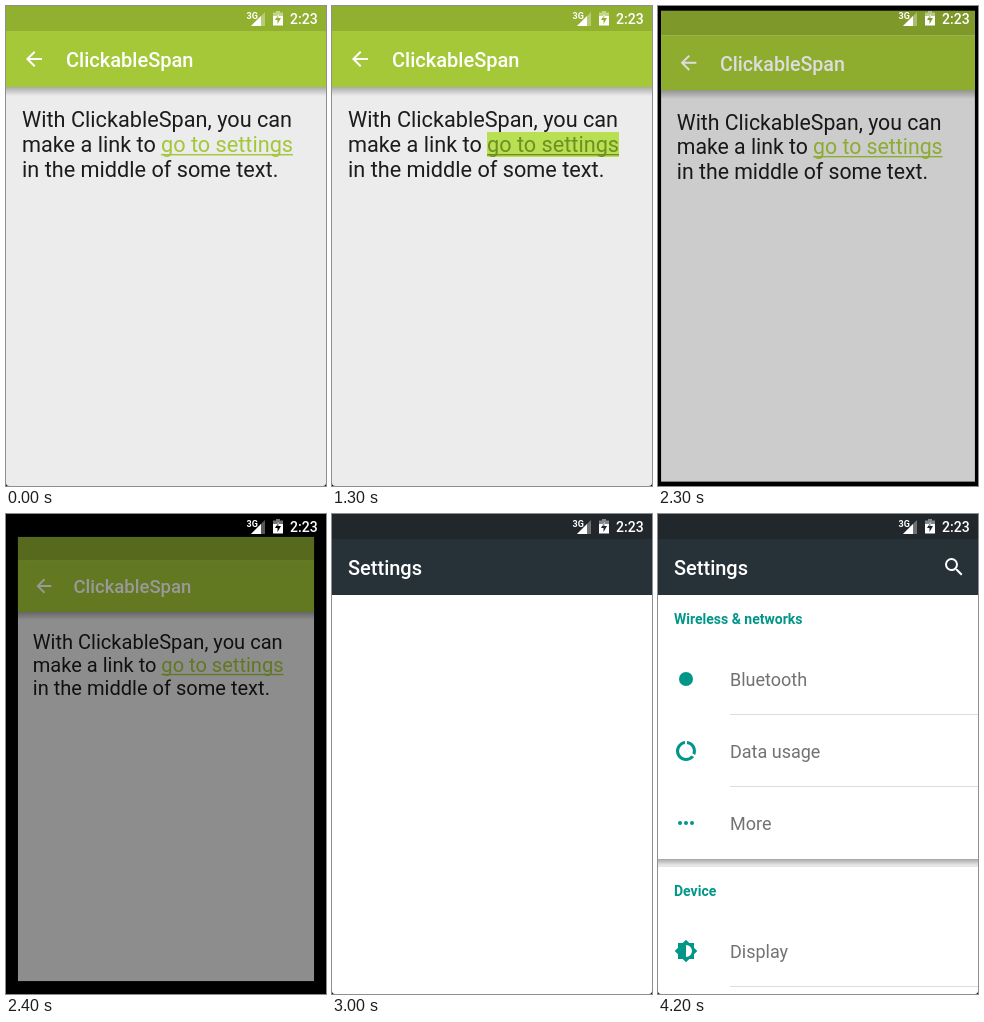
Animation of 320 by 480 pixels, one loop 4.3 s. Source, as an HTML page:

```html
<!DOCTYPE html>
<html lang="en">
<head>
<meta charset="utf-8">
<title>ClickableSpan</title>
<style>
  html, body { margin: 0; width: 100%; height: 100%; overflow: hidden; background: #000; }
  svg { display: block; width: 320px; height: 480px; border-radius: 0 0 3px 3px; font-family: Roboto, sans-serif; }
  .title { font-size: 20px; font-weight: 500; fill: #fff; }
  .body { font-size: 21.7px; fill: #1c1c1c; }
  .head { font-size: 14px; font-weight: 700; fill: #009688; }
  .item { font-size: 18px; fill: #727272; }
  .icon { fill: #009688; }
  .line { fill: #dcdcdc; }
</style>
</head>
<body>
<svg viewBox="0 0 320 480">
  <defs>
    <linearGradient id="shade" x2="0" y2="1">
      <stop stop-opacity=".28"/>
      <stop offset="1" stop-opacity="0"/>
    </linearGradient>
  </defs>
  <rect width="320" height="480"/>

  <g id="page">
    <rect width="320" height="480" fill="#ececec"/>
    <rect width="320" height="25" fill="#92b030"/>
    <rect y="25" width="320" height="56" fill="#a4c837"/>
    <rect y="81" width="320" height="9" fill="url(#shade)"/>
    <path transform="translate(16 41)" fill="#fff" d="M20 11H7.83l5.59-5.59L12 4l-8 8 8 8 1.41-1.41L7.83 13H20z"/>
    <text class="title" x="60" y="61">ClickableSpan</text>
    <rect id="press" x="155" y="126" width="132" height="25" fill="#b9e052"/>
    <g class="body">
      <text x="16" y="121">With ClickableSpan, you can</text>
      <text x="16" y="146">make a link to</text>
      <text x="16" y="171">in the middle of some text.</text>
      <g id="link">
        <text x="155" y="146">go to settings</text>
        <rect x="155" y="148" width="132" height="1.4"/>
      </g>
    </g>
  </g>

  <g id="settings">
    <rect width="320" height="480" fill="#fff"/>
    <rect width="320" height="25" fill="#21272b"/>
    <rect y="25" width="320" height="56" fill="#263238"/>
    <text class="title" x="16" y="61">Settings</text>
    <g id="list">
      <path transform="translate(284 41)" fill="#fff" d="M15.5 14h-.79l-.28-.27A6.47 6.47 0 0 0 16 9.5 6.5 6.5 0 1 0 9.5 16c1.61 0 3.09-.59 4.23-1.57l.27.28v.79l5 4.99L20.49 19zm-6 0a4.5 4.5 0 1 1 0-9 4.5 4.5 0 0 1 0 9z"/>
      <text class="head" x="16" y="110">Wireless &amp; networks</text>
      <text class="item" x="72" y="172">Bluetooth</text>
      <text class="item" x="72" y="244">Data usage</text>
      <text class="item" x="72" y="316">More</text>
      <rect y="345" width="320" height="8" fill="#e6e6e6"/>
      <rect y="345" width="320" height="6" fill="url(#shade)"/>
      <text class="head" x="16" y="382">Device</text>
      <text class="item" x="72" y="444">Display</text>
      <g class="line">
        <rect x="72" y="200" width="248" height="1"/>
        <rect x="72" y="272" width="248" height="1"/>
        <rect x="72" y="472" width="248" height="1"/>
      </g>
      <g class="icon">
        <circle cx="28" cy="165" r="7"/>
        <path transform="translate(16 225)" d="M13 2.05v3.03a7 7 0 0 1 5.52 9.46l2.6 1.53A10 10 0 0 0 13 2.05zM12 19a7 7 0 0 1-1-13.92V2.05a10 10 0 1 0 9.05 15.86l-2.6-1.53A7 7 0 0 1 12 19z"/>
        <circle cx="22" cy="309" r="2"/>
        <circle cx="28" cy="309" r="2"/>
        <circle cx="34" cy="309" r="2"/>
        <path transform="translate(16 425)" d="M20 15.31L23.31 12 20 8.69V4h-4.69L12 .69 8.69 4H4v4.69L.69 12 4 15.31V20h4.69L12 23.31 15.31 20H20zM12 18V6a6 6 0 0 1 0 12z"/>
      </g>
    </g>
  </g>

  <g fill="#fff">
    <path d="M259 6v14h-14z" opacity=".35"/>
    <path d="M255 10v10h-10z"/>
    <text x="240.5" y="13" font-size="9" font-weight="700" textLength="0">3G</text>
    <path d="M267 6.5h3V5h4v1.5h3V12h-10z" opacity=".45"/>
    <path fill-rule="evenodd" d="M267 10h10v9.5h-10zM272.5 8l-3.5 6h2.5v4l3.5-6h-2.5z"/>
    <text x="284" y="18" font-size="14" font-weight="500">2:23</text>
  </g>
</svg>
<script>
  const LOOP = 4300, STEP = 100;
  const $ = id => document.getElementById(id);
  const [page, press, link, settings, list] = ["page", "press", "link", "settings", "list"].map($);
  document.querySelectorAll("[textLength]").forEach(e => e.removeAttribute("textLength"));

  const part = (t, start, length) => Math.min(1, Math.max(0, (t - start) / length));
  const smooth = p => p * p * (3 - 2 * p);
  const show = (el, on) => el.setAttribute("visibility", on ? "inherit" : "hidden");

  function draw(t) {
    const pressed = t >= 1300 && t < 1900;
    show(press, pressed);
    link.setAttribute("fill", pressed ? "#6e8f22" : "#a4c639");

    // The page shrinks, dims and sinks
    const scale = 1 - 0.1 * smooth(part(t, 2228, 256));
    const sink = 33 * (Math.max(0, t - 2272) / 328) ** 2;
    page.setAttribute("transform", `translate(160 ${240 + sink}) scale(${scale}) translate(-160 -240)`);
    page.setAttribute("opacity", 1 - 0.4 * part(t, 2250, 150));

    // Settings slide up over it
    const rest = (1 - part(t, 2450, 430)) ** 3;
    show(settings, t > 2450);
    settings.setAttribute("transform", `translate(0 ${Math.round(528 * rest)})`);
    settings.setAttribute("opacity", 1 - 0.145 * rest);
    show(list, t >= 3100 && t > 2450);
  }

  const begin = performance.now();
  function tick() {
    const t = (performance.now() - begin) % LOOP;
    draw(Math.floor(t / STEP) * STEP);
    requestAnimationFrame(tick);
  }
  tick();
</script>
</body>
</html>
```
